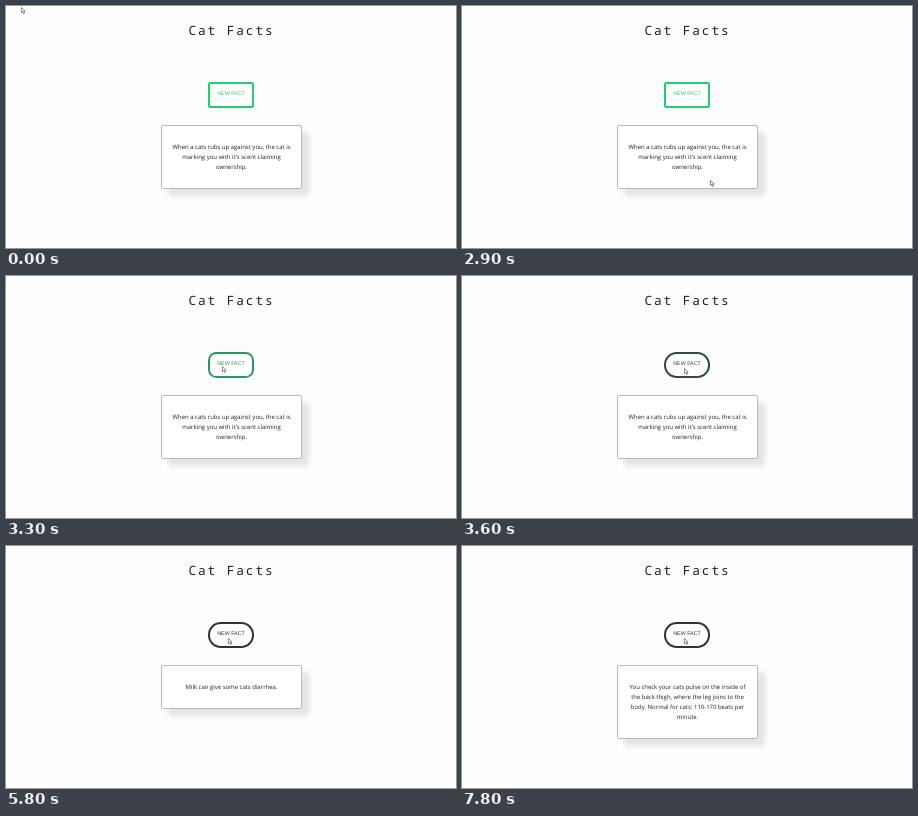
These frames come from a looping animation (450 by 242 pixels, 8000 ms). An HTML page:

```html
<!DOCTYPE html>
<html lang="en">
<head>
<meta charset="utf-8">
<title>Cat Facts</title>
<style>
  html, body { margin: 0; width: 100%; height: 100%; overflow: hidden; background: #fdfdfd; }
  body { position: relative; text-rendering: geometricPrecision; }
  h1, #button, #card, #cursor { position: absolute; box-sizing: border-box; margin: 0; }
  h1 {
    left: 182.4px; top: 14px; color: #222; white-space: nowrap;
    font: 300 12.8px/20px "Noto Sans Mono", monospace; letter-spacing: 1.9px;
  }
  #button {
    left: 202px; top: 76px; width: 46px; height: 25.5px; border: 2px solid;
    background: #fff; text-align: center; white-space: nowrap;
    font: 5.33px/21.5px "Liberation Sans", Arial, sans-serif;
  }
  #card {
    left: 155px; top: 119px; width: 141px; padding: 16px 0; border: 1px solid #b9b9b9;
    border-radius: 2px; background: #fff; box-shadow: 7px 7px 5px rgba(0, 0, 0, .1);
    color: #222; text-align: center; white-space: pre;
    font: 5.97px/10px "Open Sans", "Noto Sans", sans-serif;
  }
  #cursor { left: 0; top: 0; width: 6px; height: 8px; overflow: visible; }
</style>
</head>
<body>
<h1>Cat Facts</h1>
<div id="button">NEW FACT</div>
<div id="card"></div>
<svg id="cursor"><path d="M.5 .5V5.6L1.7 4.5L2.6 6.5L3.5 6.1L2.6 4.2H4.2Z" fill="#fff" stroke="#444" stroke-width=".6"/></svg>
<script>
const LOOP = 8000, STEP = 100;
const HOVER_START = 3150, HOVER_TIME = 700;

const facts = [
  [0, "When a cats rubs up against you, the cat is\nmarking you with it's scent claiming\nownership."],
  [5600, "Milk can give some cats diarrhea."],
  [7500, "You check your cats pulse on the inside of\nthe back thigh, where the leg joins to the\nbody. Normal for cats: 110-170 beats per\nminute."]
];

// Cursor tip: time, x, y
const path = [
  [0, 15, 1], [300, 105, 70], [600, 250, 155], [900, 369, 99], [1100, 376, 98.5],
  [2000, 376, 98.5], [2300, 390, 179], [2400, 390, 179], [2900, 248, 174],
  [3300, 216, 90], [3500, 222, 92], [LOOP, 222, 92]
];

const [button, card, cursor] = ["button", "card", "cursor"].map(id => document.getElementById(id));
const mix = (a, b, p) => a + (b - a) * p;
const blend = (a, b, p) => `rgb(${a.map((v, i) => Math.round(mix(v, b[i], p)))})`;

function cursorAt(t) {
  const i = path.findIndex(k => k[0] > t);
  const [t0, x0, y0] = path[i - 1], [t1, x1, y1] = path[i];
  const p = (t - t0) / (t1 - t0);
  return [mix(x0, x1, p), mix(y0, y1, p)];
}

function draw(t) {
  const [x, y] = cursorAt(t);
  cursor.style.transform = `translate(${x}px, ${y}px)`;

  const linear = Math.min(1, Math.max(0, (t - HOVER_START) / HOVER_TIME));
  const hover = Math.sin(linear * Math.PI / 2);
  button.style.borderRadius = Math.min(12.75, mix(2.5, 20, hover)) + "px";
  button.style.borderColor = blend([38, 204, 107], [51, 51, 51], hover);
  button.style.color = blend([60, 195, 100], [45, 45, 45], hover);

  const text = facts.findLast(f => f[0] <= t)[1];
  if (card.textContent !== text) card.textContent = text;
}

const start = performance.now();
function tick() {
  const t = (performance.now() - start) % LOOP;
  draw(Math.floor(t / STEP) * STEP);
  requestAnimationFrame(tick);
}
tick();
</script>
</body>
</html>
```
